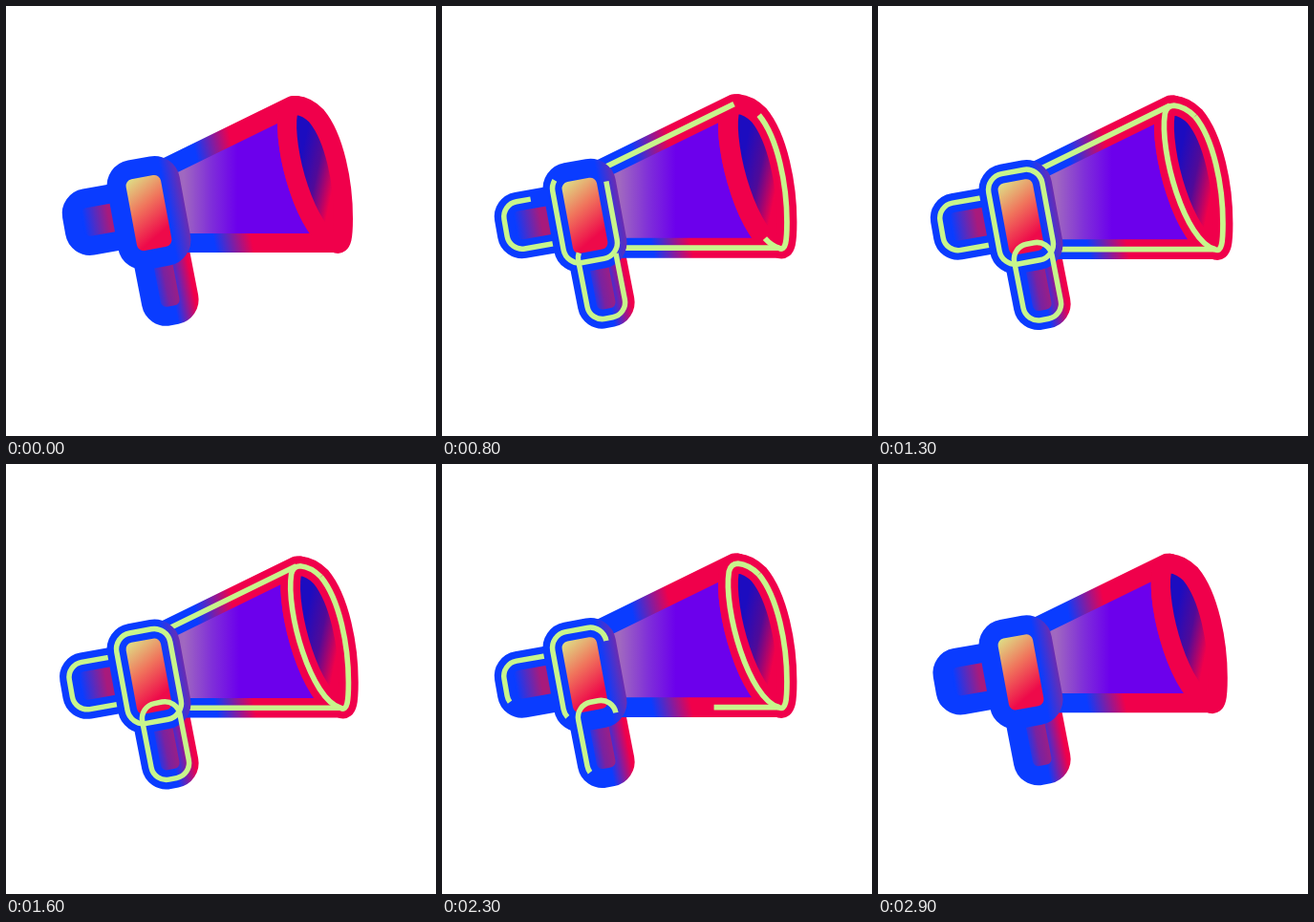
Write an HTML page that moves like this. It is 450 px wide and 450 px high and loops after 3000 ms.

```html
<!DOCTYPE html>
<html>
<head>
<meta charset="utf-8">
<style>
  html, body { margin: 0; height: 100%; overflow: hidden; background: #fff; }
  svg { display: block; width: 100%; height: 100%; }
  path { stroke-width: 20; stroke-linejoin: round; }
  .line { fill: none; stroke: #c8f58c; stroke-width: 5.5; }
</style>
</head>
<body>
<svg viewBox="0 0 450 450">
  <defs id="defs"></defs>
  <g id="all">
    <g id="back"></g>
    <g id="handle" transform="translate(167 284) rotate(-11)"></g>
    <g id="horn"></g>
    <g id="band" transform="translate(149.5 216.5) rotate(-10.5)"></g>
    <g id="grip" transform="translate(167 284) rotate(-11)"></g>
  </g>
</svg>
<script>
const $ = id => document.getElementById(id);
const BLUE = '#0a3cff', RED = '#f0004b';
const lines = [];

function add(parent, tag, attrs) {
  const el = document.createElementNS('http://www.w3.org/2000/svg', tag);
  for (const key in attrs) el.setAttribute(key, attrs[key]);
  return parent.appendChild(el);
}

function gradient(id, [x1, y1, x2, y2], ...colors) {
  const g = add($('defs'), 'linearGradient', { id, x1, y1, x2, y2, gradientUnits: 'userSpaceOnUse' });
  colors.forEach((c, i) => add(g, 'stop', { offset: i / (colors.length - 1), 'stop-color': c }));
  return `url(#${id})`;
}

// Centred rounded rectangle, clockwise from the top of its right side
function roundRect(w, h, r) {
  const x = w / 2, y = h / 2, arc = `A${r} ${r} 0 0 1 `;
  return `M${x} ${r - y}V${y - r}${arc}${x - r} ${y}H${r - x}${arc}${-x} ${y - r}` +
         `V${r - y}${arc}${r - x} ${-y}H${x - r}${arc}${x} ${r - y}`;
}

const shape = (parent, d, fill, stroke) => add($(parent), 'path', { d: d + 'Z', fill, stroke });

// from..to is the share of the drawing progress this line takes up
function line(parent, d, from = 0, to = 1) {
  const el = add($(parent), 'path', { d, class: 'line', pathLength: 1 });
  lines.push({ el, from, to });
}

const backPath = roundRect(72, 50, 16);
const handlePath = roundRect(40, 81, 16);
const bandPath = roundRect(57, 96, 17);
const bodyPath = 'M300 104L155 175V248H345';
const sidePath = 'C315 240 289 150 295 112Q297 104 304 104';
const rimPath = `M325 115C344 138 353 185 353 222C353 240 352 252 345 248${sidePath}Q315 105 325 115`;

shape('back', backPath, gradient('backFill', [-25, 0, 2, 0], BLUE, '#a81a7c'), BLUE);
line('back', backPath);

shape('handle', handlePath,
  gradient('handleFill', [-14, 0, 12, 0], BLUE, '#7a22a0', '#a01e80'),
  gradient('handleEdge', [4, 0, 26, 0], BLUE, RED));

const hornEdge = gradient('hornEdge', [208, 200, 246, 192], BLUE, RED);
shape('horn', bodyPath + sidePath, gradient('hornFill', [186, 0, 242, 0], '#a068c0', '#8030d8', '#6c00ec'), hornEdge);
shape('horn', rimPath, gradient('rimFill', [306, 172, 344, 180], '#1c0cc0', '#500a98', RED), RED);
line('horn', bodyPath, 0, 0.55);
line('horn', rimPath, 0.55, 1);

shape('band', bandPath,
  gradient('bandFill', [-18, -38, 15, 19], '#dde488', '#f0755c', '#ee0a4a'),
  gradient('bandEdge', [20, 0, 41, 0], BLUE, '#7a2aa6'));
line('band', bandPath);
line('grip', handlePath);

const clamp = x => Math.min(1, Math.max(0, x));
const ease = x => (1 - Math.cos(Math.PI * clamp(x))) / 2;

function draw(now) {
  const t = now % 3000, beat = t % 500;
  const bob = 7 * (1 - Math.abs(t % 1000 / 500 - 1));
  const pulse = beat < 200 ? ease(beat / 200) : 1 - ease((beat - 200) / 300);

  $('all').setAttribute('transform', `translate(0 ${bob})`);
  $('horn').setAttribute('transform', `translate(178 195) scale(${1 + 0.061 * pulse}) translate(-178 -195)`);
  $('back').setAttribute('transform', `translate(${106 - 5.3 * pulse} ${222.5 + 0.8 * pulse}) rotate(-10)`);

  const drawn = ease((t - 165) / 935), erased = ease((t - 1885) / 870);
  for (const { el, from, to } of lines) {
    const start = clamp((erased - from) / (to - from));
    const end = clamp((drawn - from) / (to - from));
    el.style.strokeDasharray = `0 ${start} ${end - start} 2`;
    el.style.display = end - start > 0.001 ? '' : 'none';
  }
}

const began = performance.now();
function tick() {
  draw(performance.now() - began);
  requestAnimationFrame(tick);
}
tick();
</script>
</body>
</html>
```
